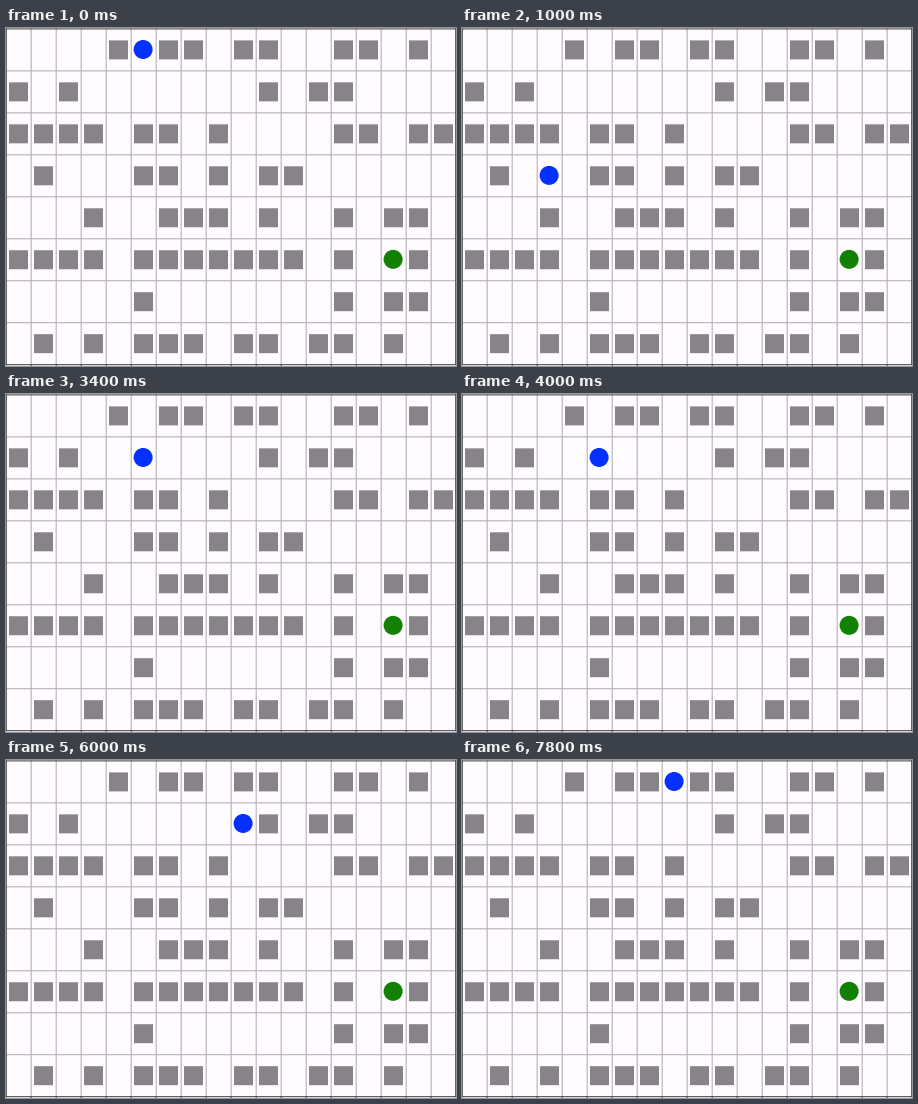
These frames come from a looping animation (450 px wide and 338 px high, 8 s). A matplotlib script:

```python
import matplotlib.pyplot as plt
from matplotlib.animation import FuncAnimation
from matplotlib.patches import Circle, Rectangle

W, H, DPI = 450, 338, 64
PX = 72 / DPI  # points per pixel
CELL_W, CELL_H = 25, 41.97
TOP = 0.9
SIDE, RADIUS = 19, 9.5
STEP_MS, FRAMES = 200, 40

WALLS = [
    "....#.##.##..##.#.",
    "#.#.......#.##....",
    "####.##.#....##.##",
    ".#...##.#.##......",
    "...#..###.#..#.##.",
    "####.#######.#..#.",
    ".....#.......#.##.",
    ".#.#.###.##.##.#..",
]
START, GOAL = (5, 0), (15, 5)

# walks: first step in ms, time between steps, compass headings
WALKS = [
    (100, 450, "SW S SW W"),
    (2800, 300, "E NE NE"),
    (4100, 500, "E E NE SE SE NW NW"),
]

PAPER, GRID, EDGE = "#fefcfe", "#b4b2b4", "#4c4b4c"
WALL, AGENT, TARGET = "#868487", "#0530ff", "#118003"


def cell_center(col, row):
    return CELL_W * (col + 0.5), TOP + CELL_H * (row + 0.5)


def add_wall(col, row):
    x, y = cell_center(col, row)
    ax.add_patch(Rectangle((x - SIDE / 2, y - SIDE / 2), SIDE, SIDE,
                           color=WALL, lw=0, snap=False, zorder=3))


def disc_center(cell):
    x, y = cell_center(*cell)
    return x - 0.4, y - 0.4


def add_disc(cell, color):
    disc = Circle(disc_center(cell), RADIUS, color=color, lw=0, zorder=4)
    ax.add_patch(disc)
    return disc


def rule(xs, ys, color, zorder):
    ax.plot(xs, ys, color=color, lw=1.1 * PX, snap=False, zorder=zorder)


def agent_cell(now):
    col, row = START
    for begin, gap, headings in WALKS:
        for i, heading in enumerate(headings.split()):
            if begin + i * gap <= now:
                col += ("E" in heading) - ("W" in heading)
                row += ("S" in heading) - ("N" in heading)
    return col, row


fig = plt.figure(figsize=(W / DPI, H / DPI), dpi=DPI, facecolor=PAPER)
ax = fig.add_axes([0, 0, 1, 1])
ax.set_xlim(0, W)
ax.set_ylim(H, 0)
ax.axis("off")

rows, cols = len(WALLS), len(WALLS[0])
bottom = TOP + rows * CELL_H
for i in range(1, cols):
    x = i * CELL_W + 0.2
    rule([x, x], [0, bottom], GRID, 1)
    rule([x, x], [bottom, H], EDGE, 2)
for i in range(1, rows):
    y = TOP + i * CELL_H
    rule([0, W], [y, y], GRID, 1)
for x in (0.3, W - 0.3):
    rule([x, x], [0, bottom], EDGE, 2)
for y in (TOP, bottom):
    rule([0, W], [y, y], EDGE, 2)

for row, line in enumerate(WALLS):
    for col, mark in enumerate(line):
        if mark == "#":
            add_wall(col, row)

add_disc(GOAL, TARGET)
agent = add_disc(START, AGENT)


def update(frame):
    agent.center = disc_center(agent_cell(frame * STEP_MS))
    return (agent,)


anim = FuncAnimation(fig, update, frames=FRAMES, interval=STEP_MS,
                     repeat=True, repeat_delay=0)
plt.show()
```
